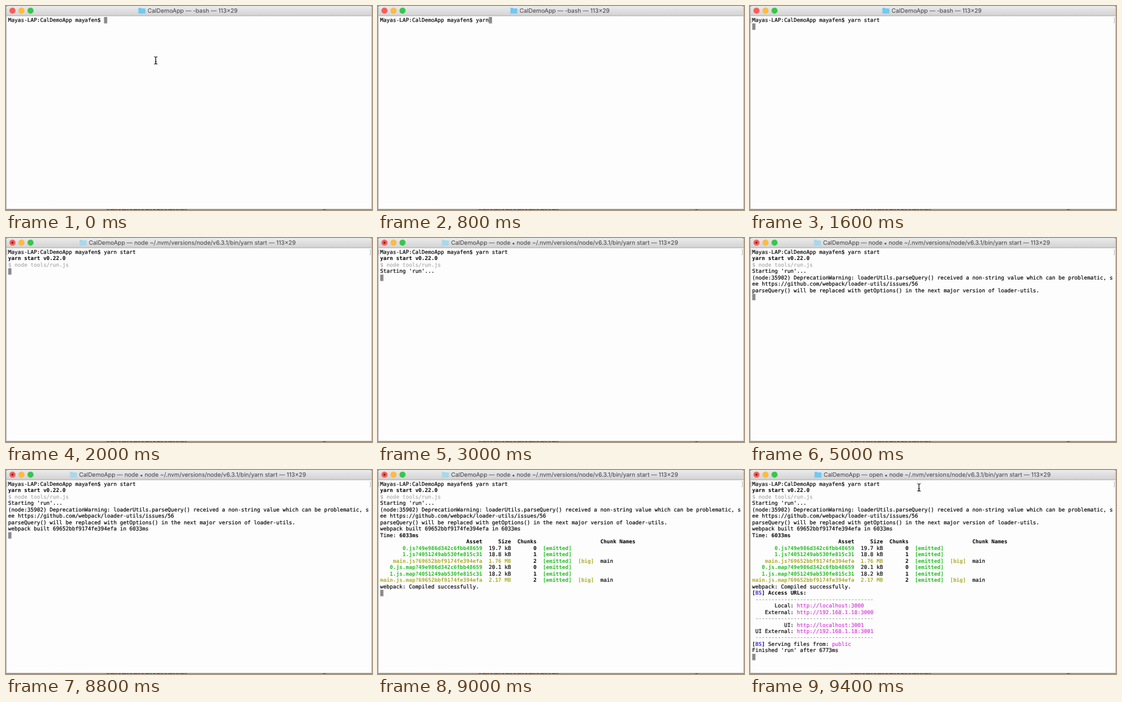
An HTML page that plays this animation: 600x334 px, repeating every 9.6 s.

```html
<!DOCTYPE html>
<html lang="en">
<head>
<meta charset="utf-8">
<title>Terminal</title>
<style>
  html, body { margin: 0; width: 100%; height: 100%; overflow: hidden; background: #fefdfe; }
  svg { display: block; width: 600px; height: 334px; }
  text { white-space: pre; text-rendering: geometricPrecision; }
  #rows text { font: 8.696px "DejaVu Sans Mono", monospace; stroke-width: .18px; }
  #rows tspan { fill: var(--ink, #000); stroke: var(--ink, #000); }
  #titles text { font: 9.6px Inter, "DejaVu Sans", sans-serif; fill: #404040; }
  #titles .arrow { font-size: 7px; letter-spacing: 1.2px; }
  #rows .b, #rows .green, #rows .gold, #rows .blue { font-weight: bold; stroke: none; }
  #rows .dim { --ink: #aaa; }
  #rows .rule { --ink: #777; }
  #rows .green { --ink: #25bc24; }
  #rows .gold { --ink: #adad27; }
  #rows .blue { --ink: #492ee1; }
  #rows .pink { --ink: #d338d3; }
</style>
</head>
<body>
<svg viewBox="0 0 600 334">
  <defs>
    <linearGradient id="bar" x2="0" y2="1">
      <stop stop-color="#ebebeb"/>
      <stop offset="1" stop-color="#d2d2d2"/>
    </linearGradient>
    <path id="folder" d="M0 4q0-1 1-1h3l1 1h5.5q1 0 1 1v6.500q0 1-1 1H1q-1 0-1-1z"/>
    <path id="beam" d="M-2.800-6q2.800 0 2.800 1.600V4.400q0 1.600-2.800 1.600M2.800-6Q0-6 0-4.400M0 4.400q0 1.600 2.800 1.600M-1.400 2h2.800"
          fill="none" stroke="#111" stroke-width="1.200"/>
  </defs>
  <rect width="600" height="334" fill="#fefdfe"/>
  <rect width="600" height="16" fill="url(#bar)"/>
  <path d="M0 16h600" stroke="#aaa"/>
  <path d="M0 0h3Q0 0 0 3zM600 0h-3q3 0 3 3z" fill="#555"/>
  <g stroke-width=".5">
    <circle cx="10.600" cy="7.600" r="4.700" fill="#fc5b57" stroke="#ee504c"/>
    <circle cx="25.400" cy="7.600" r="4.700" fill="#fdbd3e" stroke="#eeae38"/>
    <circle cx="40.200" cy="7.600" r="4.700" fill="#34c84a" stroke="#2db940"/>
  </g>
  <path d="M.5 3v331M599.500 3v331" stroke="#b4b4b4"/>
  <path d="M0 332.500h600" stroke="#b4b4b4"/>
  <path d="M0 333.500h600" stroke="#858585"/>
  <path d="M165 333.500h133M520 333.500h5" stroke="#333" stroke-dasharray="4 2 7 1 3 2"/>
  <g id="titles"></g>
  <g id="marks"></g>
  <rect id="cursor" width="5.300" height="10.500" fill="#8c8c8c"/>
  <g id="rows"></g>
</svg>
<script>
const LOOP = 9600, LEFT = 3.6, COL = 5.235, ROW = 10.48;
const $ = id => document.getElementById(id);
const timed = [];

function add(parent, tag, attrs, content = '') {
  const el = document.createElementNS('http://www.w3.org/2000/svg', tag);
  for (const key in attrs) el.setAttribute(key, attrs[key]);
  el.textContent = content;
  parent.append(el);
  return el;
}

function during(el, from, to = LOOP) {
  timed.push({ el, from, to });
  return el;
}

// Each part is plain text or [class, text].
function addText(parent, x, y, parts) {
  const line = add(parent, 'text', { x, y });
  for (const part of parts) {
    const [cls, text] = Array.isArray(part) ? part : ['', part];
    add(line, 'tspan', { class: cls }, text);
  }
  return line;
}

const row = (index, from, ...parts) =>
  during(addText($('rows'), LEFT, 25.95 + index * ROW, parts), from);

function title(from, to, x, color, ...parts) {
  const group = during(add($('titles'), 'g', {}), from, to);
  add(group, 'use', { href: '#folder', x: x - 15, fill: color });
  addText(group, x, 11.2, ['CalDemoApp — ', ...parts, ' — 113×29']);
}

const script = 'node ~/.nvm/versions/node/v6.3.1/bin/yarn start';
const arrow = ['arrow', '◂'];
title(0, 1800, 232, '#70caf3', '-bash');
title(1800, 2200, 135.7, '#a8d8ea', script);
title(2200, 9400, 119.7, '#a8d8ea', 'node ', arrow, ' ' + script);
title(9400, LOOP, 120.7, '#70caf3', 'open ', arrow, ' ' + script);

const marks = $('marks');
during(add(marks, 'circle', { cx: 10.6, cy: 7.6, r: 1.6, fill: '#7d1512' }), 1800);
during(add(marks, 'path', {
  d: 'M3 19.5H1.5v8H3M596 19.5h1.5v8H596',
  fill: 'none', stroke: '#b8b8b8'
}), 1600);
during(add(marks, 'use', { href: '#beam', x: 245.5, y: 89 }), 0, 400);
during(add(marks, 'use', { href: '#beam', x: 277, y: 28.5 }), 9400);

const prompt = 'Mayas-LAP:CalDemoApp mayafen$ ', command = 'yarn start';
const promptLine = row(0, 0, prompt);
row(1, 2000, ['b', 'yarn start v0.22.0']);
row(2, 2000, ['dim', '$ node tools/run.js']);
row(3, 2600, "Starting 'run'...");
row(4, 4200, '(node:35902) DeprecationWarning: loaderUtils.parseQuery() received a non-string value which can be problematic, s');
row(5, 4200, 'ee https://github.com/webpack/loader-utils/issues/56');
row(6, 4200, 'parseQuery() will be replaced with getOptions() in the next major version of loader-utils.');
row(7, 8800, 'webpack built 69652bbf9174fe394efa in 6033ms');
row(8, 9000, 'Time: ', ['b', '6033ms']);
row(9, 9000, ['b', 'Asset'.padStart(32) + 'Size'.padStart(9) + 'Chunks'.padStart(8) + ' '.repeat(20) + 'Chunk Names']);

const assets = [
  ['0.js?49e986d342c6fbb48659', '19.7 kB', 0],
  ['1.js?4051249ab530fe815c31', '18.8 kB', 1],
  ['main.js?69652bbf9174fe394efa', '1.76 MB', 2],
  ['0.js.map?49e986d342c6fbb48659', '20.1 kB', 0],
  ['1.js.map?4051249ab530fe815c31', '18.2 kB', 1],
  ['main.js.map?69652bbf9174fe394efa', '2.17 MB', 2]
];
assets.forEach(([name, size, chunk], i) => {
  const big = chunk === 2;
  row(10 + i, 9000,
    [big ? 'gold' : 'green', name.padStart(32)],
    [big ? 'gold' : '', '  ' + size],
    ['b', String(chunk).padStart(8)],
    ['green', '  [emitted]'],
    ...(big ? [['gold', '  [big]'], '  main'] : []));
});
row(16, 9000, 'webpack: Compiled successfully.');

const tag = [['b', '['], ['blue', 'BS'], ['b', '] ']];
const rule = index => row(index, 9400, ['rule', ' ' + '-'.repeat(37)]);
const link = (index, label, url) =>
  row(index, 9400, label.padStart(12) + ': ', ['pink', 'http://' + url]);
row(17, 9400, ...tag, ['b', 'Access URLs:']);
rule(18);
link(19, 'Local', 'localhost:3000');
link(20, 'External', '192.168.1.18:3000');
rule(21);
link(22, 'UI', 'localhost:3001');
link(23, 'UI External', '192.168.1.18:3001');
rule(24);
row(25, 9400, ...tag, 'Serving files from: ', ['pink', 'public']);
row(26, 9400, "Finished 'run' after 6773ms");

// Steps are [time, value]; the last one reached applies.
const typing = [[0, 0], [400, 1], [600, 3], [800, 4], [1000, 6], [1200, 9], [1400, 10]];
const cursorRows = [[0, 0], [1600, 1], [2000, 3], [2600, 4], [4200, 7], [8800, 8], [9000, 17], [9400, 27]];
const at = (steps, t) => steps.filter(([time]) => time <= t).pop()[1];

const start = performance.now();
function draw() {
  const t = Math.max(0, performance.now() - start) % LOOP;
  for (const { el, from, to } of timed)
    el.style.display = t >= from && t < to ? '' : 'none';
  const typed = at(typing, t), line = at(cursorRows, t);
  promptLine.firstChild.textContent = prompt + command.slice(0, typed);
  $('cursor').setAttribute('x', LEFT + (line ? 0 : prompt.length + typed) * COL);
  $('cursor').setAttribute('y', 18 + line * ROW);
  requestAnimationFrame(draw);
}
draw();
</script>
</body>
</html>
```
